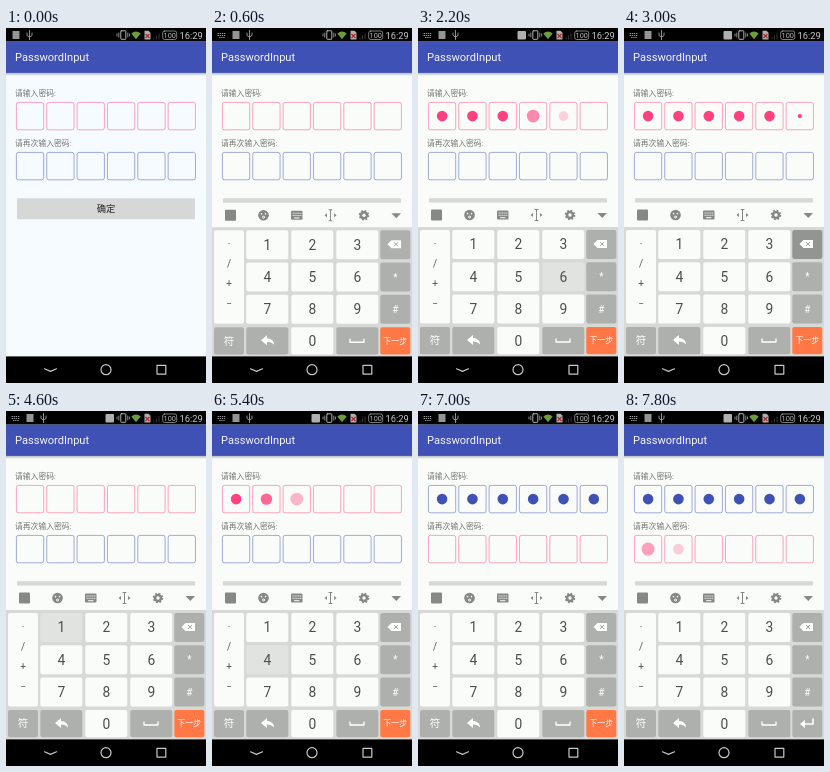
Animation of 200x355 px, one loop 8 s. Source, as an HTML page:

```html
<!DOCTYPE html>
<html lang="zh-CN">
<head>
<meta charset="utf-8">
<title>PasswordInput</title>
<style>
html, body { margin: 0; width: 100%; height: 100%; overflow: hidden; background: #000; }
svg { display: block; width: 100vw; height: 100vh; }
text { font-family: Roboto, "Noto Sans CJK SC", "Noto Sans CJK", sans-serif; }
.mid { text-anchor: middle; }
.line { fill: none; stroke-linecap: round; stroke-linejoin: round; }
</style>
</head>
<body>
<svg id="stage" viewBox="0 0 200 355">
  <defs>
    <linearGradient id="shade" x2="0" y2="1">
      <stop stop-color="#000" stop-opacity=".3"/><stop offset="1" stop-color="#000" stop-opacity="0"/>
    </linearGradient>
  </defs>
  <rect id="page" width="200" height="355"/>
  <rect y="44.500" width="200" height="3.500" fill="url(#shade)"/>
  <rect y="13.400" width="200" height="31.500" fill="#3f51b5"/>
  <text x="9" y="33.400" font-size="11.100" fill="#f4f5fb">PasswordInput</text>
  <g font-size="7.800" fill="#737573">
    <text x="9" y="68">请输入密码:</text>
    <text x="9" y="118">请再次输入密码:</text>
  </g>
  <g id="rows"></g>
  <rect x="11" y="170.300" width="178" height="21" rx="1" fill="#d6d7d7"/>
  <text class="mid" x="100" y="184.300" font-size="9.300" font-weight="500" fill="#222">确定</text>

  <g id="board">
    <rect y="174.500" width="200" height="25" fill="#f9fcf8"/>
    <rect y="199" width="200" height="130" fill="#d6d9d6"/>
    <g fill="#858885">
      <rect x="13" y="181.500" width="11" height="11" rx="1"/>
      <circle cx="51.500" cy="187" r="5.300"/>
      <rect x="79" y="182.500" width="11.500" height="9" rx="1"/>
      <path d="M179.500 185h9.500l-4.750 5z"/>
      <circle cx="152" cy="187" r="4.200"/>
      <circle cx="152" cy="187" r="4.500" fill="none" stroke="#858885" stroke-width="1.600" stroke-dasharray="1.770"/>
      <path d="M112.500 187l2.500-2v4zM124.500 187l-2.500-2v4z"/>
    </g>
    <circle cx="152" cy="187" r="1.700" fill="#f9fcf8"/>
    <g class="line" stroke="#858885"><path d="M118.500 182v10M117 181.500h3M117 192.500h3"/></g>
    <g class="line" stroke="#f9fcf8">
      <path d="M49.500 185.500v.2M53.500 185.500v.2" stroke-width="1.500"/>
      <circle cx="51.500" cy="189" r="1"/>
      <path d="M81 185h8M81 187.300h8" stroke-dasharray=".3 1.600"/>
      <path d="M82.500 189.700h4.500"/>
    </g>
    <g id="keys"></g>
    <g fill="#fff">
      <path d="M175.500 216l4-4h9.500v8h-9.500z"/>
      <path d="M49 312l6-5v3q7 .5 7 6.500q-2.500-3-7-3v3.500z"/>
      <path class="line" d="M138 311v3h14v-3" stroke="#fff" stroke-width="1.300"/>
      <path d="M182 214l4 4M186 214l-4 4" stroke="#a0a3a0"/>
    </g>
    <g id="enter" fill="#fff">
      <path d="M176 313l5-4v8z"/>
      <path class="line" d="M180 313h9v-5" stroke="#fff" stroke-width="1.600"/>
    </g>
  </g>

  <rect y="328.400" width="200" height="27" fill="#000"/>
  <g class="line" stroke="#c8c8c8" stroke-width="1.200">
    <path d="M38.500 340.800l6 2.600 6-2.600"/>
    <circle cx="100" cy="341.700" r="5"/>
    <path d="M151 337.300h8.800v8.800h-8.800z"/>
  </g>

  <rect width="200" height="13.400" fill="#000"/>
  <g opacity=".8">
    <g id="ime" class="line" stroke="#bbb"><path d="M6 5.500h8M6 7.500h8M7.500 9.500h5" stroke-dasharray=".6 1.500"/></g>
    <g id="left">
      <path d="M6.500 3h7v8h-7z" fill="#bbb"/>
      <path class="line" d="M23.500 2.500v9M21 5v2.500l2.500 1.500 2.500-1.500v-2.500" stroke="#ccc" stroke-width=".900"/>
    </g>
    <rect id="mark" x="99.500" y="3" width="8.500" height="8.500" rx="1" fill="#ddd"/>
    <g class="line" stroke="#ddd">
      <rect x="114.800" y="2.800" width="5" height="8.500" rx=".500"/>
      <path d="M112.800 5v4M121.800 5v4M111 6v2M123.600 6v2" stroke-width=".800"/>
    </g>
    <path d="M125.300 5.500q4.700-4 9.400 0l-4.700 5.800z" fill="#8bc34a"/>
    <path d="M138.500 2.800h4l2 2v6.700h-6z" fill="#ddd"/>
    <path d="M139.500 6l4 4M143.500 6l-4 4" stroke="#d33" stroke-width="1.200"/>
    <path d="M148 11.500v-2M150.500 11.500v-4M153 11.500v-6" stroke="#444"/>
    <rect class="line" x="156.700" y="3" width="14" height="8.500" rx="2" stroke="#ddd" stroke-width=".700"/>
    <text class="mid" x="163.700" y="10" font-size="7.300" fill="#eee">100</text>
  </g>
  <text x="173.500" y="10.700" font-size="9.300" fill="#ccc">16:29</text>
</svg>
<script>
const LOOP = 8000, PINK = '#ff4081', BLUE = '#3f51b5';
const $ = id => document.getElementById(id);
const clamp = v => Math.max(0, Math.min(1, v));
const set = (el, attrs) => { for (const k in attrs) el.setAttribute(k, attrs[k]); return el; };
const add = (parent, tag, attrs) =>
  set(parent.appendChild(document.createElementNS('http://www.w3.org/2000/svg', tag)), attrs);
const show = (el, on) => set(el, { visibility: on ? 'visible' : 'hidden' });

// Two rows of six password cells
const rows = [74, 124].map(y => {
  const group = add($('rows'), 'g', {}), dots = [];
  for (let i = 0; i < 6; i++) {
    const x = 10.4 + 30.35 * i;
    add(group, 'rect', {
      x, y: y + .4, width: 27.3, height: 27.4, rx: 2,
      fill: 'none', 'stroke-width': .6, 'stroke-opacity': .8
    });
    dots.push(add(group, 'circle', { cx: x + 13.7, cy: y + 14.1, stroke: 'none' }));
  }
  return { group, dots };
});

// Keypad
const keys = {}, WHITE = '#fafcf9', GREY = '#adb0ad';
const cols = [[2, 30], [34.3, 42], [79.3, 42], [124.3, 42], [168.3, 30]];
function key(name, col, row, fill, label = '', size = 13.8, span = 1) {
  const [x, width] = cols[col], y = 202 + 32.3 * row, tall = row < 3 ? 29 : 27.4;
  keys[name] = add($('keys'), 'rect',
    { x, y, width, height: tall + 32.3 * (span - 1), rx: 2, fill });
  const text = add($('keys'), 'text', {
    class: 'mid', x: x + width / 2, y: y + tall / 2 + size * .36,
    'font-size': size, fill: fill === WHITE ? '#4c4e4c' : '#fff'
  });
  text.textContent = label;
  return text;
}
key('side', 0, 0, WHITE, '', 10, 3);
['·', '/', '+', '−'].forEach((s, i) => {
  add($('keys'), 'text', { class: 'mid', x: 17, y: 219.5 + 19.7 * i, 'font-size': 10, fill: '#555' }).textContent = s;
});
for (let n = 1; n < 10; n++) key(n, (n - 1) % 3 + 1, Math.floor((n - 1) / 3), WHITE, n);
key('del', 4, 0, GREY);
key('star', 4, 1, GREY, '*', 10);
key('hash', 4, 2, GREY, '#', 10);
key('sym', 0, 3, GREY, '符', 10.5);
key('back', 1, 3, GREY);
key(0, 2, 3, WHITE, 0);
key('space', 3, 3, GREY);
const nextText = key('next', 4, 3, '#ff7846', '下一步', 8);

// Each run enters digits 1, 2, 3... at a steady pace
const runs = [
  { row: 0, start: 1120, gap: 237, count: 6, end: 4200 },
  { row: 0, start: 4670, gap: 250, count: 6, end: LOOP },
  { row: 1, start: 7500, gap: 150, count: 3, end: LOOP }
];
const ERASE = 2850, ERASE_GAP = 205, SWITCH = 6990;

function dotAt(run, i, t) {
  const p = clamp((t - run.start - i * run.gap) / 600);
  if (!p || i >= run.count || t >= run.end) return null;
  let r = 5.3 * Math.min(1, .2 + 2.8 * p) + 1.2 * Math.sin(Math.PI * p) ** 2;
  if (run === runs[0]) r *= 1 - clamp((t - ERASE - (5 - i) * ERASE_GAP) / 250);
  return { r, opacity: p };
}

function draw(t) {
  const rise = 1 - (1 - clamp((t - 230) / 420)) ** 3;
  const switched = t >= SWITCH, enter = t >= 7150;
  set($('page'), { fill: t < 200 ? '#f5fbff' : '#f9fcf8' });
  set($('board'), { transform: `translate(0 ${154 * (1 - rise)})` });
  show($('board'), rise > 0);
  show($('ime'), t >= 400);
  set($('left'), { transform: `translate(${t >= 400 ? 14 : 0} 0)` });
  show($('mark'), t >= 700 && t < 5790 || t >= 7590);

  rows.forEach(({ group, dots }, n) => {
    const color = (n === 1) === switched ? PINK : BLUE;
    set(group, { stroke: color, fill: color });
    dots.forEach((dot, i) => {
      const state = runs.filter(run => run.row === n).map(run => dotAt(run, i, t)).find(Boolean);
      set(dot, state || { r: 0 });
    });
  });

  for (let n = 1; n < 7; n++) {
    const down = runs.some(({ start, gap, count }) => {
      const age = t - start - (n - 1) * gap;
      return n <= count && age >= -110 && age < 0;
    });
    set(keys[n], { fill: down ? '#e0e3e0' : WHITE });
  }
  const erase = t - ERASE;
  const deleting = erase >= 0 && erase < 6 * ERASE_GAP && erase % ERASE_GAP < 165;
  set(keys.del, { fill: deleting ? '#929592' : GREY });
  set(keys.next, { fill: enter ? GREY : t >= 6790 && t < SWITCH ? '#df6337' : '#ff7846' });
  show(nextText, !enter && rise > 0);
  show($('enter'), enter);
}

const begin = performance.now();
function tick() {
  draw((performance.now() - begin) % LOOP);
  requestAnimationFrame(tick);
}
tick();
</script>
</body>
</html>
```
